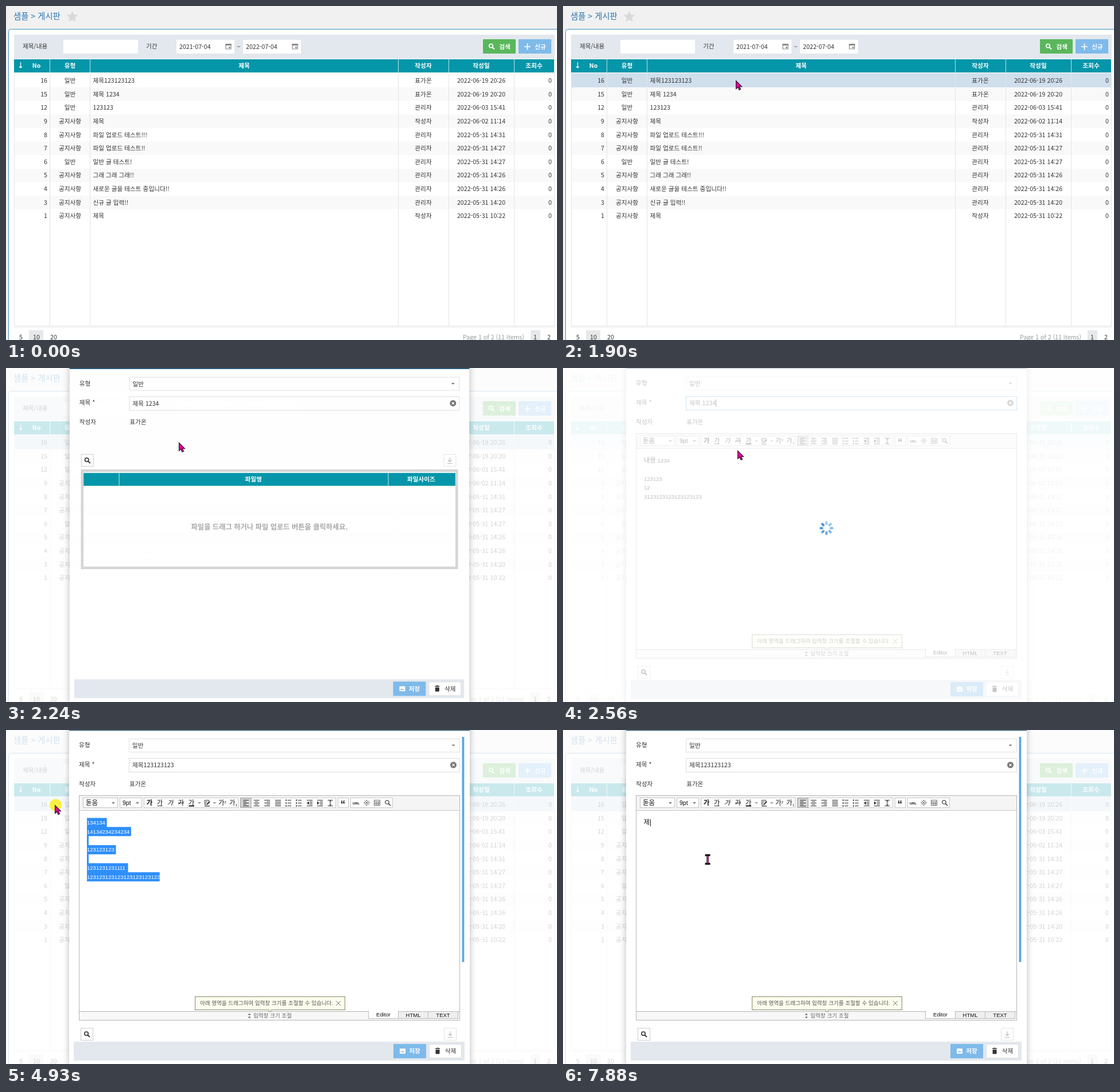
These frames come from a looping animation (960x583 px, 8000 ms). An HTML page:

```html
<!DOCTYPE html>
<html lang="ko">
<head>
<meta charset="utf-8">
<title>게시판</title>
<style>
html, body { margin: 0; height: 100%; overflow: hidden; background: #f1f1f1; }
svg { display: block; width: 960px; height: 583px; }
text { font: 10.63px "Noto Sans CJK KR", "Noto Sans KR", "Noto Sans CJK", sans-serif; fill: #333; white-space: pre; }
.m { text-anchor: middle; }
.e { text-anchor: end; }
.b { font-weight: 700; }
.w { fill: #fff; }
.g { fill: #999; }
.ed text { font: 9.55px "Liberation Sans", "Noto Sans CJK KR", sans-serif; fill: #111; }
.ed .k { font-size: 11.4px; }
.ed .w { fill: #fff; }
.ed .g { fill: #666; }
.ed .b { font-weight: 700; }
</style>
</head>
<body>
<svg id="stage" viewBox="0 0 960 583"></svg>
<script>
const T = (x, y, s, cls = '', more = '') => `<text x="${x}" y="${y + 3.9}" class="${cls}" ${more}>${s}</text>`;
const R = (x, y, w, h, fill, more = '') => `<rect x="${x}" y="${y}" width="${w}" height="${h}" fill="${fill}" ${more}/>`;
const P = (d, stroke, w = 1, fill = 'none') => `<path d="${d}" stroke="${stroke}" stroke-width="${w}" fill="${fill}"/>`;
const G = (id, body, more = '') => `<g id="${id}" ${more}>${body}</g>`;
const box = (x, y, w, h, stroke, fill = '#fff', more = '') => R(x + .5, y + .5, w - 1, h - 1, fill, `stroke="${stroke}" ${more}`);
const at = (x, y, body) => `<g transform="translate(${x} ${y})">${body}</g>`;

const lens = (x, y, c, w = 1.6) => at(x, y, `<circle cx="-1" cy="-1" r="3.2" fill="none" stroke="${c}" stroke-width="${w}"/>` + P('M1.4 1.4L5 5', c, w + .3));
const down = (x, y, c = '#777') => P(`M${x - 3} ${y - 1.5}h6l-3 3z`, 'none', 0, c);
const calendar = x => at(x, 70.5, P('M-4.5 -4h9v8.5h-9z', '#888', 1.2) + R(-5, -4.6, 10, 3, '#888') + R(.5, .5, 2.6, 2.6, '#888'));
const cross = (x, y, r, c, w = 1.3) => P(`M${x - r} ${y - r}l${2 * r} ${2 * r}m0 ${-2 * r}l${-2 * r} ${2 * r}`, c, w);

// ---- list page
const author = '표가온', admin = '관리자', writer = '작성자', notice = '공지사항', plain = '일반';
const rows = [
  [16, plain, '제목123123123', author, '06-19 20:26'],
  [15, plain, '제목 1234', author, '06-19 20:20'],
  [12, plain, '123123', admin, '06-03 15:41'],
  [9, notice, '제목', writer, '06-02 11:14'],
  [8, notice, '파일 업로드 테스트!!!', admin, '05-31 14:31'],
  [7, notice, '파일 업로드 테스트!!', admin, '05-31 14:27'],
  [6, plain, '일반 글 테스트!', admin, '05-31 14:27'],
  [5, notice, '그래 그래 그래!!', admin, '05-31 14:26'],
  [4, notice, '새로운 글을 테스트 중입니다!!', admin, '05-31 14:26'],
  [3, notice, '신규 글 입력!!', admin, '05-31 14:20'],
  [1, notice, '제목', writer, '05-31 10:22']
];
const rowY = i => 130 + 23.65 * i;
const heads = [[53, 'No'], [111.5, '유형'], [415, '제목'], [727, '작성자'], [828, '작성일'], [920, '조회수']];
const cols = [76.5, 146.5, 683.5, 771.5, 885.5];
const star = Array.from({length: 10}, (_, i) => {
  const a = i * Math.PI / 5, r = i % 2 ? 4.8 : 10.5;
  return [115.5 + r * Math.sin(a), 19 - r * Math.cos(a)];
}).join(' ');

const page = R(0, 0, 960, 583, '#f1f1f1')
  + T(13, 19, '샘플 &gt; 게시판', '', 'style="font-size:14.3px;fill:#2a74b0"')
  + `<polygon points="${star}" fill="#d9d9d9"/>`
  + R(4.5, 40.5, 990, 600, '#fff', 'rx="4" stroke="#3f8fc4"')
  + R(14, 50, 942, 42, '#e3e8ee')
  + T(29, 70, '제목/내용') + R(100, 59, 130, 24, '#fff') + T(244, 70, '기간')
  + [297, 413].map((x, i) => R(x, 59, 101, 24, '#fff') + T(x + 5, 71, `202${i + 1}-07-04`) + calendar(x + 90.5)).join('')
  + T(405.5, 71, '~', 'm')
  + R(831, 58, 57, 25, '#5ab75c', 'rx="1"') + lens(846, 70.5, '#fff', 1.8) + T(869, 71, '검색', 'm b w')
  + R(893, 58, 57, 25, '#7fbaea', 'rx="1"') + P('M903 71h11M908.5 65.5v11', '#fff', 1.7) + T(931, 71, '신규', 'm b w')
  + R(14, 93, 941, 23, '#0596a9')
  + P('M25.5 98v9.5M23 105.5l2.5 2.5 2.5-2.5', '#fff', 1.2)
  + heads.map(h => T(...h.toSpliced(1, 0, 104), 'm b w')).join('')
  + rows.map((_, i) => i % 2 ? R(15, rowY(i) - 11.8, 940, 23.65, '#f9f9f9') : '').join('')
  + R(15, 117, 940, 25, '#d0dfec', 'id="picked"')
  + P(cols.map(x => `M${x} 116V559`).join('') + 'M14.5 116V559M955.5 116V559M14 558.5H956', '#e2e5e8')
  + P('M14 560.5H956', '#e8e8e8')
  + P(cols.map(x => `M${x} 93v23`).join(''), '#b9e2e8')
  + rows.map(([no, kind, title, by, date], i) => {
      const y = rowY(i);
      return T(72, y, no, 'e') + T(111.5, y, kind, 'm') + T(151.5, y, title)
        + T(727, y, by, 'm') + T(828, y, '2022-' + date, 'm') + T(951, y, 0, 'e');
    }).join('')
  + R(40, 566, 25, 20, '#e6e8ea') + R(914, 566, 17, 20, '#e6e8ea')
  + T(26, 578, 5, 'm') + T(53, 578, 10, 'm') + T(83, 578, 20, 'm')
  + T(796, 578, 'Page 1 of 2 (11 items)', 'g') + T(922, 578, 1, 'm') + T(946, 578, 2, 'm');

// ---- popup
const form = T(127, 26.5, '유형') + T(127, 60, '제목 *') + T(127, 94, '작성자') + T(215, 94, author)
  + box(214, 15, 577, 24, '#e0e0e0') + T(220, 27.5, plain) + down(779.5, 27)
  + box(214, 49, 577, 25, '#ddd', '#fff', 'id="field"') + T(220, 61.5, '', '', 'id="title"')
  + R(266, 55, 1, 13, '#222', 'id="titleCaret"')
  + '<circle cx="779.5" cy="61" r="5.5" fill="#777"/>' + cross(779.5, 61, 2.1, '#fff');

const files = box(130, 520, 22, 22, '#ccc') + lens(141, 531, '#333')
  + box(763, 520, 22, 22, '#e3e3e3') + P('M774 526v7M771 530.5l3 3 3-3M769.500 536.500h9', '#bbb', 1.2)
  + R(132, 549, 654, 170, '#fff', 'stroke="#d5d5d5" stroke-width="4.5"')
  + R(134.5, 553, 649, 22.500, '#0596a9') + P('M196.500 553v22.500M666.500 553v22.500', '#cdeaee')
  + T(431, 564, '파일명', 'm b w') + T(724, 564, '파일사이즈', 'm b w')
  + T(459, 648, '파일을 드래그 하거나 파일 업로드 버튼을 클릭하세요.', 'm b', 'style="font-size:12.3px;fill:#a8a8a8"');

const footer = R(111, 543, 696, 42, '#fff') + R(118, 544, 681, 33, '#e3e8ee')
  + R(675, 548, 57, 25, '#7fbaea') + R(686, 556, 10, 9, '#fff', 'rx="1"') + P('M687.500 562.500l2.500-2.500 1.500 1.500 1.500-1 1.500 2z', 'none', 0, '#7fbaea')
  + T(712, 560.5, '저장', 'm b w')
  + box(737, 548, 57, 25, '#ddd') + R(748.5, 558, 7, 7.5, '#333', 'rx="1"') + R(748, 555.5, 8, 1.5, '#333') + R(750.5, 554.5, 3, 1, '#333')
  + T(774.5, 560.5, '삭제', 'm');

// ---- editor
const lineY = i => 161.5 + 15.8 * i;
const lines = (list, cls) => list.map((s, i) => T(141, lineY(i) - .4, s, cls)).join('');
const oldBody = ['<tspan class="k">내용</tspan> 1234', '', '123123', '12', '3' + '123'.repeat(6)];
const body = ['134134', '14134234234234', '', '123123123', '', '1231231231111', '123'.repeat(8)];
const lineEnd = i => 141 + body[i].length * 5.28 + (i < 6 ? 3 : 0);

// four-line glyphs: each bar gets an inset on its left and right
const bars = (x, insets, c = '#333') => P(insets.map(([l, r], i) => `M${x - 5 + l} ${122.5 + 2.5 * i}H${x + 5 - r}`).join(''), c);
const full = [0, 0];
const ga = (x, extra = '', more = '') => T(x, 127, '가' + extra, 'k m', more);
const marks = x => [122.5, 127.5, 132.5].map(y => R(x - 5, y - 1, 2, 2, '#333') + P(`M${x - 1.5} ${y}h6.5`, '#333')).join('');
const tool = box(134, 118, 61, 18, '#c4c4c4') + T(139, 127, '돋움', 'k') + down(187, 127.5)
  + box(198, 118, 39, 18, '#c4c4c4') + T(203, 126.7, '9pt', '', 'style="font-size:10.5px"') + down(229, 127.5)
  + [[240, 165], [408, 167], [578, 19], [600, 74]].map(([x, w]) => box(x, 118, w, 18, '#c8c8c8')).join('')
  + R(409, 119, 18, 16, '#d8d8d8', 'stroke="#999"')
  + ga(250, '', 'style="font-weight:800"') + ga(268) + P('M263.500 132.500h9', '#333')
  + at(287, 127, `<g transform="skewX(-14)">${T(0, 0, '가', 'k m')}</g>`)
  + ga(305) + P('M300 127.500h10', '#333') + ga(323) + R(318.5, 131.5, 9.5, 2, '#111') + down(337, 127.5, '#999')
  + P('M346.500 122.500h7v3l-4 5h-3zM347.500 125h4M347.500 127.500h2', '#444') + P('M350 130l5-5', '#333', 2) + R(346, 132, 9, 1.5, '#555') + down(363.5, 127.5, '#999')
  + ga(377, '<tspan dy="-3" style="font-size:6px">2</tspan>') + ga(396, '<tspan dy="2" style="font-size:6px">1</tspan>')
  + bars(418, [full, [0, 4], full, [0, 4], full]) + bars(436.5, [full, [2, 2], full, [2, 2], full])
  + bars(455, [full, [4, 0], full, [4, 0], full]) + bars(474, [full, full, full, full, full])
  + marks(492) + marks(510)
  + [529, 547].map((x, i) => bars(x, [full, [5, 0], [5, 0], [5, 0], full]) + P(i ? `M${x - 5} 124.500l4 3-4 3z` : `M${x - 1} 124.500l-4 3 4 3z`, 'none', 0, '#333')).join('')
  + P('M560.500 122.500h9M560.500 132.500h9M565 123v9M563 125.500l2-2 2 2M563 129.500l2 2 2-2', '#333')
  + T(587, 131, '“', 'm b', 'style="font-size:17px"') + T(610, 125.8, 'URL', 'm b', 'style="font-size:5.800px"')
  + cross(628.5, 127, 3.5, '#333', 1) + [[-4, 0], [4, 0], [0, -4], [0, 4]].map(([x, y]) => R(627.7 + x, 126.2 + y, 1.6, 1.6, '#333')).join('')
  + P('M641.500 122.500h10v9h-10zM641.500 125.500h10M641.500 128.500h10M645 125v6M648.500 125v6', '#666') + lens(665, 127, '#444', 1.3);

const tab = (x, y, w, s, fill) => box(x, y, w, 504 - y, '#bbb', fill) + T(x + w / 2, (y + 504) / 2 - .8, s, 'm');
const editor = box(127, 114, 664, 393, '#b5b5b5') + R(128, 115, 662, 25, '#f5f5f5') + P('M128 140.500h662', '#c8c8c8')
  + tool
  + R(128, 491, 662, 15, '#f8f8f8') + P('M128 491.500h662', '#b5b5b5')
  + tab(683, 491, 53, 'HTML', '#efefef') + tab(735, 491, 53, 'TEXT', '#efefef')
  + tab(631, 490, 53, 'Editor', '#fff') + R(632, 490, 51, 2, '#fff')
  + P('M421.500 497.500l2.500-3 2.500 3zM421.500 500.500l2.500 3 2.500-3z', 'none', 0, '#666') + T(431, 498.5, '입력창 크기 조절', 'g')
  + box(329, 465, 262, 24, '#88886c', '#fdfdee') + P('M456.500 488.500l3.500 4 3.500-4', '#88886c', 1, '#fdfdee')
  + T(338, 476.5, '아래 영역을 드래그하여 입력창 크기를 조절할 수 있습니다.', '', 'style="fill:#555"') + cross(579, 477, 4, '#777', 1)
  + G('oldBody', lines(oldBody)) + G('body', lines(body))
  + `<clipPath id="sel">${body.map(() => '<rect height="16"/>').join('')}</clipPath>`
  + G('selected', R(130, 150, 300, 130, '#2f8ffb') + lines(body, 'w'), 'clip-path="url(#sel)"')
  + T(140.5, 161.5, '', 'k', 'id="typed"') + R(0, 156, 1, 12, '#111', 'id="caret"');

const popup = R(110, -25.5, 698, 611, '#fff', 'style="filter:drop-shadow(0 0 6px rgba(0,0,0,.28))"')
  + R(110, -25.5, 698, 26.5, '#003a61') + T(118.5, -12, '제목 1234', 'b w', 'style="font-size:11.700px"') + cross(794, -12, 3.3, '#fff', 1.8)
  + form + G('files', files) + G('editor', editor, 'class="ed"') + footer + R(794.5, 12, 3.8, 393, '#5aa8e4', 'id="bar"');

const petals = Array.from({length: 8}, (_, i) =>
  R(-2, -12, 4, 6.5, '#3a8dd0', `rx="1.500" opacity="${.45 + i * .07}" transform="rotate(${i * 45})"`)).join('');

const serif = 'M-4.500 -7.500h9M-4.500 7.500h9';
stage.innerHTML = page
  + R(0, 0, 960, 583, '#fff', 'id="shade" opacity=".79"')
  + G('popup', popup)
  + G('loading', R(0, 0, 960, 583, '#fff', 'opacity=".72"') + at(459, 279.5, G('spinner', petals)))
  + G('mouse', '<circle id="press" cx="1.500" r="10.500" fill="#f8ee2a" opacity=".9"/>'
    + G('arrow', P('M.5 .5V14.500L3.800 11.500 6 16.500 8.500 15.500 6.300 10.800H10.500Z', '#2b0a24', 1.1, '#e8009c'))
    + G('beam', P(serif + 'M0 -8v16', '#23101f', 3.6) + P('M0 -6v12', '#e8009c', 2)));

// ---- motion
const $ = id => document.getElementById(id);
const show = (id, on) => $(id).setAttribute('display', on ? 'inline' : 'none');
const clamp = (v, a, b) => Math.min(b, Math.max(a, v));
const path = [
  [130, 816, 543], [890, 331, 190], [960, 331, 190], [1370, 301, 130], [2490, 301, 130], [2560, 304, 144],
  [2760, 320, 160], [3370, 320, 160], [3480, 308, 200], [3700, 308, 243], [3900, 308, 243],
  [4180, 331, 257], [4250, 331, 259], [4920, 85, 131], [5050, 85, 131], [5200, 252, 226], [8000, 252, 226]
];
const typing = [
  [5730, ''], [5930, 'ㅈ'], [6130, '제'], [6660, '젬'], [6830, '제모'], [7000, '제목'],
  [7160, '제목ㅇ'], [7330, '제목이'], [7530, '제목ㅇ'], [7680, '제목'], [7880, '제']
];
const LOADED = 3000, CLEARED = 5730;

function pointer(t) {
  const i = Math.max(1, path.findIndex(k => k[0] > t));
  const [t0, x0, y0] = path[i - 1], [t1, x1, y1] = path[i];
  const u = clamp((t - t0) / (t1 - t0), 0, 1), e = u * u * (3 - 2 * u);
  return [x0 + (x1 - x0) * e, y0 + (y1 - y0) * e];
}

function draw(t) {
  show('picked', t >= 1700);
  const u = clamp((t - 1962) / 300, 0, 1), p = 1 - (1 - u) ** 2;
  show('shade', u > 0);
  show('popup', u > 0);
  $('popup').setAttribute('opacity', p);
  $('popup').setAttribute('transform', `translate(459 280) scale(${.55 + .45 * p}) translate(-459 -280)`);

  const ready = t >= 2380, loaded = t >= LOADED, cleared = t >= CLEARED;
  show('editor', ready);
  $('files').setAttribute('transform', `translate(0 ${ready ? 0 : -370})`);
  $('title').textContent = loaded ? '제목123123123' : '제목 1234';
  $('field').setAttribute('stroke', t >= 2430 && t < 4150 ? '#62a8dc' : '#ddd');
  show('titleCaret', t >= 2430 && t < 2960);
  show('bar', loaded);
  show('loading', t >= 2550 && !loaded);
  $('spinner').setAttribute('transform', `rotate(${Math.floor((t - 2550) / 90) * 45})`);
  show('oldBody', !loaded);
  show('body', loaded && !cleared);

  const [x, y] = pointer(t);
  const dragged = t >= 4250 && !cleared;
  const [sx, sy] = t < 5000 ? [x, y] : [85, 131];
  show('selected', dragged);
  [...$('sel').children].forEach((r, i) => {
    const top = lineY(i) - 8, end = lineEnd(i);
    const from = sy < top ? 141 : sy < top + 15.8 || i === 6 ? clamp(sx, 141, end) : end;
    r.setAttribute('x', i === 0 && sy < 154 ? 141 : from);
    r.setAttribute('y', top);
    r.setAttribute('width', end - (i === 0 && sy < 154 ? 141 : from));
  });

  const [since, text] = typing.findLast(k => k[0] <= t) || [0, ''];
  $('typed').textContent = text;
  $('caret').setAttribute('x', 141.5 + text.length * 10.5);
  show('caret', cleared && (t - since) % 1060 < 530);

  const inside = loaded && x > 128 && x < 790 && y > 141 && y < 490;
  show('mouse', t >= 130);
  $('mouse').setAttribute('transform', `translate(${x} ${y})`);
  show('arrow', !inside);
  show('beam', inside);
  show('press', t >= 1630 && t < 1770 || t >= 4250 && t < 5030);
}

const start = performance.now();
(function tick() {
  draw((performance.now() - start) % 8000);
  requestAnimationFrame(tick);
})();
</script>
</body>
</html>
```
